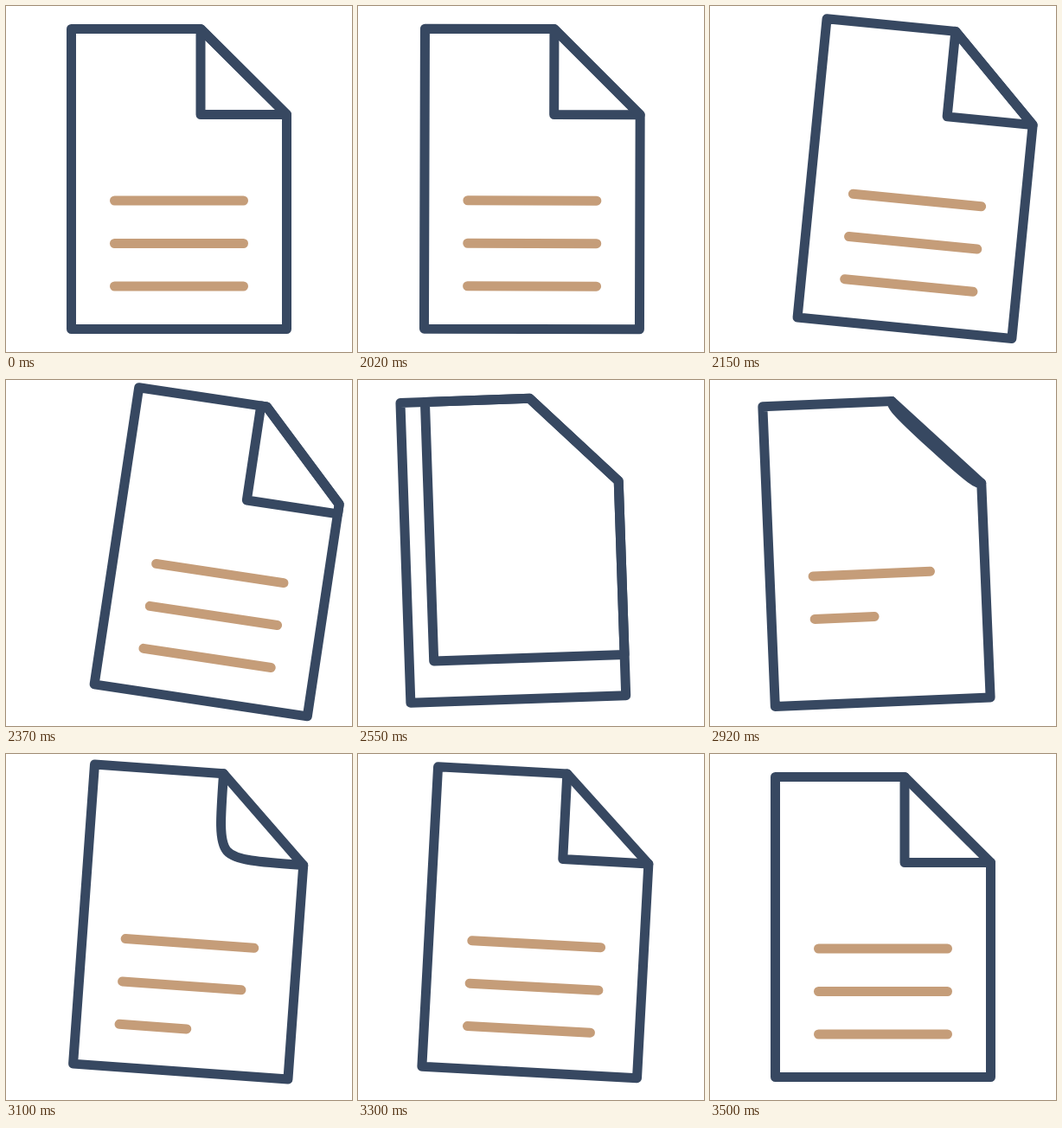
Write an HTML page that moves like this. It is 400x400 px and loops after 3520 ms.

```html
<!DOCTYPE html>
<html lang="en">
<head>
<meta charset="utf-8">
<title>Page turn</title>
<style>
  html, body { margin: 0; height: 100%; overflow: hidden; background: #fff; }
  svg { display: block; width: 100vw; height: 100vh; }
  path { stroke-width: 11; stroke-linecap: round; stroke-linejoin: round; fill: none; stroke: #374861; }
  .text { stroke: #c59d79; }
  #fold { fill: #fff; }
</style>
</head>
<body>
<svg viewBox="0 0 400 400">
  <g id="page">
    <path class="text"/>
    <path class="text"/>
    <path class="text"/>
    <path id="fold"/>
    <path d="M75.5 26.5H225L324.5 125.5V373.5H75.5Z"/>
  </g>
</svg>
<script>
const LOOP = 3520;
const FOLD_START = 2328, FOLD_END = 2641;
const LEFT = 75.5, TOP = 26.5, RIGHT = 324.5, BOTTOM = 373.5;
const NOTCH_X = 225, NOTCH_Y = 125.5;

// Keyframes as [time, value]
const swayX = [[1993, 0], [2325, 55], [2766, -39], [3200, 16], [3500, 0]];
const swayY = [[1993, 0], [2340, -1], [2530, -4.5], [2766, 1.2], [3200, -7], [3500, 0]];
const tilt = [[1993, 0], [2325, 9], [2766, -7], [3200, 4.75], [3500, 0]];

const page = document.getElementById("page");
const fold = document.getElementById("fold");
const lines = document.querySelectorAll(".text");

const lerp = (a, b, k) => a + (b - a) * k;
const progress = (t, start, end) => Math.min(1, Math.max(0, (t - start) / (end - start)));
const smooth = u => (1 - Math.cos(Math.PI * u)) / 2;

// Cubic bezier easing (x1, 0, x2, 1)
const bezier = (x1, x2) => u => {
  let lo = 0, hi = 1;
  for (let i = 0; i < 20; i++) {
    const s = (lo + hi) / 2, r = 1 - s;
    if (3 * s * r * (r * x1 + s * x2) + s ** 3 < u) lo = s; else hi = s;
  }
  return lo * lo * (3 - 2 * lo);
};
const settle = bezier(0.33, 0.2);
const swing = bezier(0.38, 0.38);

function track(keys, t, ease) {
  let value = keys[0][1];
  for (let i = 1; i < keys.length; i++) {
    value = lerp(value, keys[i][1], ease(progress(t, keys[i - 1][0], keys[i][0])));
  }
  return value;
}

// The flap sweeps down over the whole page
function turningFold(t) {
  const k = smooth(progress(t, FOLD_START, FOLD_END));
  const x = lerp(NOTCH_X, LEFT, k), y = lerp(NOTCH_Y, BOTTOM, k);
  return `M${NOTCH_X} ${TOP}H${x}V${y}H${RIGHT}V${NOTCH_Y}Z`;
}

// A new flap bulges out of the cut corner and sharpens
function growingFold(t) {
  const k = settle(progress(t, 2850, 3350));
  const x = lerp((NOTCH_X + RIGHT) / 2, NOTCH_X, k);
  const y = lerp((TOP + NOTCH_Y) / 2, NOTCH_Y, k);
  const handleY = lerp(TOP, NOTCH_Y, k), handleX = lerp(RIGHT, NOTCH_X, k);
  return `M${NOTCH_X} ${TOP}
    C${NOTCH_X} ${lerp(TOP, handleY, 2 / 3)} ${NOTCH_X} ${handleY} ${x} ${y}
    C${handleX} ${NOTCH_Y} ${lerp(RIGHT, handleX, 2 / 3)} ${NOTCH_Y} ${RIGHT} ${NOTCH_Y}`;
}

function draw(t) {
  const turning = t < FOLD_END;
  const x = track(swayX, t, settle), y = track(swayY, t, smooth);
  page.setAttribute("transform",
    `translate(${x} ${y}) rotate(${track(tilt, t, swing)} 200 200)`);
  fold.setAttribute("d", turning ? turningFold(t) : growingFold(t));
  lines.forEach((line, i) => {
    const start = 2600 + i * 167;
    const length = turning ? 149 : 149 * settle(progress(t, start, start + 500));
    line.setAttribute("d", length > 0.1 ? `M125.5 ${225 + i * 49.5}h${length}` : "");
  });
}

function tick() {
  draw(performance.now() % LOOP);
  requestAnimationFrame(tick);
}
tick();
</script>
</body>
</html>
```
